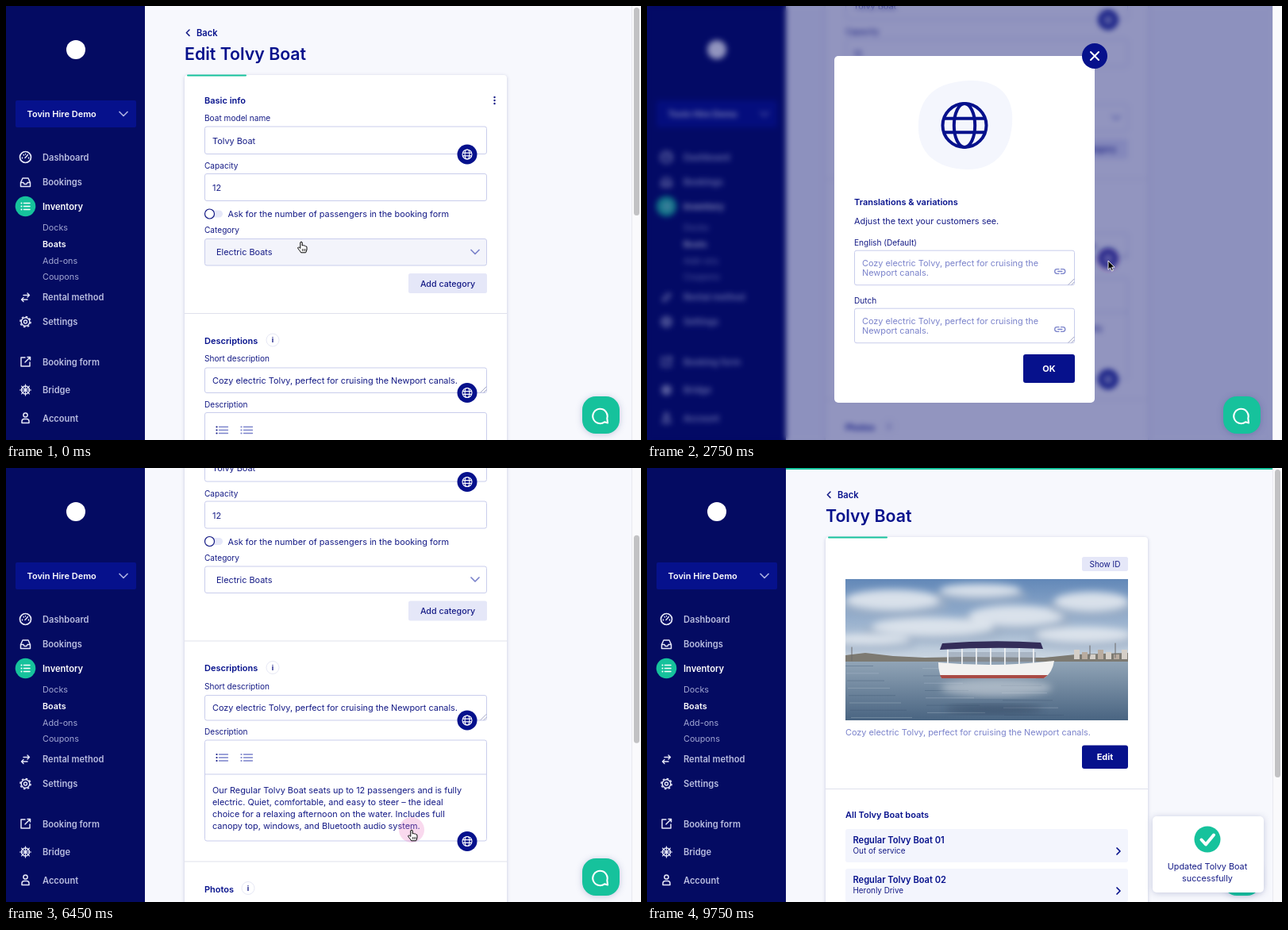
Recreate the animation shown at these times as an HTML page. Size 800 px wide and 547 px high, loop 9.8 s.

```html
<!DOCTYPE html>
<html lang="en">
<head>
<meta charset="utf-8">
<title>Edit boat</title>
<style>
  html, body { margin: 0; width: 100%; height: 100%; overflow: hidden; background: #f7f8fd; }
  #stage { position: relative; width: 800px; height: 547px; overflow: hidden; }
  svg, #veil { position: absolute; left: 0; top: 0; }
  svg { display: block; font-family: Inter, "Noto Sans", sans-serif; }
  #veil { width: 788px; height: 547px; background: rgba(4, 10, 108, .43); backdrop-filter: blur(3.5px); }
  .card { filter: drop-shadow(0 1px 2px rgba(20, 30, 110, .22)); }
  .float { filter: drop-shadow(0 1px 4px rgba(20, 30, 110, .22)); }
</style>
</head>
<body>
<div id="stage">
  <svg id="base" width="800" height="547"></svg>
  <div id="veil"></div>
  <svg id="top" width="800" height="547"></svg>
</div>
<script>
const NAVY = '#06118c', INK = '#151b86', SOFT = '#7b83cb', LINE = '#c9cdec', TEAL = '#16c29c',
      PALE = '#e5e7f8', MIST = '#f3f5fd', DIM = '#b9bde0', RULE = '#dfe1ec';
const BOAT = 'Tolvy Boat', BLURB = 'Cozy electric Tolvy, perfect for cruising the Newport canals.';

// Drawing helpers, each returns markup
const rect = (x, y, w, h, fill, r = 0, more = '') =>
  `<rect x="${x}" y="${y}" width="${w}" height="${h}" rx="${r}" fill="${fill}" ${more}/>`;
const disc = (x, y, r, fill, more = '') => `<circle cx="${x}" cy="${y}" r="${r}" fill="${fill}" ${more}/>`;
const oval = (x, y, rx, ry, fill, more = '') =>
  `<ellipse cx="${x}" cy="${y}" rx="${rx}" ry="${ry}" fill="${fill}" ${more}/>`;
const line = (d, color, w = 1.5, more = '') =>
  `<path d="${d}" fill="none" stroke="${color}" stroke-width="${w}" stroke-linecap="round" stroke-linejoin="round" ${more}/>`;
const text = (x, y, s, size = 10.9, fill = INK, weight = 400, anchor = 'start') =>
  `<text x="${x}" y="${y}" font-size="${size}" fill="${fill}" font-weight="${weight}" text-anchor="${anchor}">${s}</text>`;
const bold = (x, y, s, fill = NAVY) => text(x, y, s, 11, fill, 600);
const label = (x, y, s) => text(x, y, s, 10.1);
const group = (id, body, more = '') => `<g id="${id}" ${more}>${body}</g>`;
const rule = y => rect(225, y, 406, 1, RULE);
const box = (x, y, w, h, more = '') => rect(x, y, w, h, '#fff', 2.5, `stroke="${LINE}" ${more}`);
const button = (x, y, w, h, s) =>
  rect(x, y, w, h, NAVY, 3) + text(x + w / 2, y + h / 2 + 4, s, 11, '#fff', 700, 'middle');

function globe(x, y, r, w, color) {
  const a = r * .92, b = r * .32;
  return disc(x, y, r, 'none', `stroke="${color}" stroke-width="${w}"`) +
    oval(x, y, r * .48, r, 'none', `stroke="${color}" stroke-width="${w}"`) +
    line(`M${x - a} ${y - b}H${x + a}M${x - a} ${y + b}H${x + a}`, color, w);
}
const globeButton = y => disc(581, y, 12.5, NAVY) + globe(581, y, 6, 1.1, '#fff');
const info = (x, y) => disc(x, y, 8, '#fff', `stroke="#e6e8f5"`) + text(x, y + 3.2, 'i', 9, INK, 700, 'middle');
const toggle = y => rect(252, y - 4.5, 21, 9, PALE, 4.5) + disc(256.5, y, 6, '#fff', `stroke="${INK}" stroke-width="1.2"`);
const chevron = (x, y, color) => line(`M${x - 5} ${y - 2.5}l5 5 5-5`, color, 1.7);
const grip = (x, y, color = '#8a8fb5') => line(`M${x - 7} ${y}l7-7M${x - 3} ${y}l3-3`, color, .8);
const bullets = (x, y, color) => [-4, 0, 4].map(d =>
  line(`M${x - 3.5} ${y + d}h11`, SOFT, 1.3) + disc(x - 6.5, y + d, 1.1, color)).join('');

function header(title) {
  return line('M231 30l-3.7 3.7 3.7 3.7', INK, 1.5) + text(240, 37.6, 'Back', 11.1, NAVY, 600) +
    text(225, 68, title, 21.3, NAVY, 600);
}
const card = h => rect(225, 87, 406, h, '#fff', 4, 'class="card"') + rect(228, 86.5, 75, 2, TEAL, 1);

// Soft picture of a boat on a bay, 356 by 178
function photo() {
  const clouds = [[60, 28, 70, 16], [170, 16, 60, 10], [215, 48, 70, 16], [310, 30, 55, 15],
    [110, 62, 90, 14], [300, 72, 70, 12], [30, 78, 60, 8]];
  let s = rect(0, 0, 356, 178, 'url(#sky)');
  s += '<g filter="url(#soft)">' + clouds.map(([x, y, a, b]) =>
    oval(x, y + 5, a, b, '#9fb0c6', 'opacity=".7"') + oval(x, y - 2, a * .85, b * .8, '#e6ebf1', 'opacity=".85"')).join('') + '</g>';
  s += rect(0, 102, 356, 76, 'url(#sea)');
  s += `<path d="M0 104V96L25 93 60 97 100 99 150 98 250 99 290 95 356 93V104Z" fill="#7d7a72"/>`;
  for (let i = 0; i < 7; i++) s += rect(288 + i * 10, 89 + i % 3 * 3, 7, 12 - i % 3 * 3, i % 2 ? '#b9aca0' : '#d5cfc8');
  s += line('M8 103V86M340 99V81M308 97V84', '#6d6a6a', 1);
  for (let i = 0; i < 22; i++) {
    const y = 109 + i * 3.1, x = (i * 97) % 290;
    s += rect(x, y, 35 + i * 2, 1, i % 2 ? '#b5c4d2' : '#39546f', 0, 'opacity=".35"');
  }
  s += oval(190, 137, 70, 11, '#d6dce2', 'opacity=".55" filter="url(#soft)"');
  s += oval(187, 164, 62, 6, '#2c3c58', 'opacity=".45" filter="url(#soft)"');
  s += rect(128, 92, 112, 13, '#8e9aa9', 0, 'opacity=".5"');
  for (let i = 0; i < 7; i++) s += rect(128 + i * 18, 87, 1.8, 21, '#eef0f2');
  s += `<path d="M119 89L122 81Q184 76 246 80L249 88Q184 85 119 89Z" fill="#332d59"/>`;
  s += `<path d="M117 105Q190 112 263 103Q261 118 250 125H121Q117 116 117 105Z" fill="#f2f2f1"/>`;
  return s + `<path d="M119 121H255L250 125H121Z" fill="#a94b45"/>`;
}

function editPage() {
  let s = rect(175, 0, 614, 1125, '#f7f8fd') + header('Edit ' + BOAT) + card(985.5);
  s += bold(250, 123, 'Basic info') + [-4, 0, 4].map(d => disc(615.5, 119 + d, 1.2, INK)).join('');
  s += label(250, 144.5, 'Boat model name') + box(250.5, 152, 355, 34.5) + text(260, 173.5, BOAT) + globeButton(187);
  s += label(250, 205, 'Capacity') + box(250.5, 211.5, 355, 34) + text(260, 233, '12');
  s += toggle(262) + text(279.5, 266.2, 'Ask for the number of passengers in the booking form');
  s += label(250, 286, 'Category') + box(250.5, 293.5, 355, 33.5, 'id="pick"') + text(265, 314, 'Electric Boats') + chevron(591, 310, SOFT);
  s += rect(507, 337, 99, 25, PALE, 2.5) + text(556.5, 353.5, 'Add category', 10.7, INK, 500, 'middle') + rule(387);
  s += bold(250, 425.7, 'Descriptions') + info(336, 421);
  s += label(250, 448, 'Short description') + box(250.5, 456, 355, 31.5) + grip(605, 487) + text(260, 475.7, BLURB) + globeButton(487.5);
  s += label(250, 505.5, 'Description') + box(250.5, 512.5, 355, 127) + rect(250.5, 555, 355, 1, LINE);
  s += bullets(272, 534.5, INK) + bullets(303, 534.5, SOFT);
  ['Our Regular ' + BOAT + ' seats up to 12 passengers and is fully', 'electric. Quiet, comfortable, and easy to steer – the ideal',
    'choice for a relaxing afternoon on the water. Includes full', 'canopy top, windows, and Bluetooth audio system.'
  ].forEach((row, i) => s += text(260, 579 + i * 15.1, row));
  s += globeButton(640) + rule(665);
  s += bold(250, 704, 'Photos') + info(305, 699);
  s += rect(250.5, 718, 355, 102.5, MIST, 3, `stroke="${LINE}" stroke-dasharray="3 2"`);
  s += line('M418 751h-3v19h19v-3', NAVY, 2, 'stroke-dasharray="2.5 3.2" stroke-linecap="butt"') +
    rect(421.5, 744, 20, 20, MIST, 1, `stroke="${NAVY}" stroke-width="2"`) +
    line('M422 760l6-6 4 4 4-4 5 5', NAVY, 1.8) + disc(435.5, 749.5, 1.9, 'none', `stroke="${NAVY}" stroke-width="1.3"`);
  s += text(428, 792, 'Drop images here', 10.9, SOFT, 400, 'middle');
  s += rect(535.5, 830.5, 70, 24.5, '#fff', 2.5, `stroke="${NAVY}"`) + text(570.5, 847.2, 'Pick file', 10.9, INK, 400, 'middle');
  s += rect(250.5, 865, 355, 32, '#fff', 2, 'stroke="#eceef7"');
  s += [-3.8, -1.3, 1.3, 3.8].map(d => rect(258.5, 880.5 + d, 6.5, 1, INK)).join('');
  s += '<g transform="translate(273 865.4) scale(.177)"><use href="#photo"/></g>' + text(345, 885.5, 'Bay-Island-Specs-v1-768x536.jpg', 11, SOFT);
  s += disc(589, 881, 7, NAVY) + line('M586.5 878.5l5 5m0-5l-5 5', '#fff', 1.4);
  s += rule(923) + toggle(954.5) + text(279.5, 959, 'Limit the number of boats per booking') + rule(986);
  return s + button(531, 1011.5, 75, 36, 'Save');
}

function viewPage() {
  let s = rect(175, 0, 614, 547, '#f7f8fd') + header(BOAT) + card(560);
  s += rect(548, 112, 58, 18, PALE, 2.5) + text(577, 124.6, 'Show ID', 10, INK, 400, 'middle');
  s += '<g transform="translate(250 140)"><use href="#photo"/></g>' + text(250, 337, BLURB, 10.9, SOFT);
  s += button(548, 349.5, 58, 29.5, 'Edit') + rule(404) + bold(250, 441.3, `All ${BOAT} boats`);
  [['01', 'Out of service'], ['02', 'Heronly Drive']].forEach(([n, note], i) => {
    const y = 455 + i * 50;
    s += rect(250, y, 356, 42, MIST, 3) + text(259.5, y + 17.7, `Regular ${BOAT} ${n}`, 11.1, NAVY, 600) +
      text(259.5, y + 31, note, 9.9) + line(`M592 ${y + 24}l4 4-4 4`, NAVY, 1.7);
  });
  return s;
}

function sidebar() {
  const W = '#e6e8f8', w = 1.5;
  let s = rect(0, 0, 175, 547, '#040b62') + disc(88, 55, 12, '#fff');
  s += rect(12, 119, 152, 34, NAVY, 2) + text(26.5, 140, 'Tovin Hire Demo', 11, '#fff', 600) + chevron(148, 136, '#a9aee0');
  s += disc(24.5, 252.5, 12.8, TEAL);
  [['Dashboard', 194.5], ['Bookings', 226], ['Inventory', 256.5, 1], ['Rental method', 371], ['Settings', 402],
    ['Booking form', 452.5], ['Bridge', 487.7], ['Account', 523.5]
  ].forEach(([name, y, on]) => s += text(46, y, name, 11.1, on ? '#fff' : DIM, 600));
  ['Docks', 'Boats', 'Add-ons', 'Coupons'].forEach((name, i) =>
    s += text(46, 283 + i * 20.8, name, 10.8, i === 1 ? '#fff' : '#a2a7d3', i === 1 ? 600 : 400));
  s += disc(24.5, 190.5, 7, 'none', `stroke="${W}" stroke-width="1.7"`) + line('M24 191.5l3.5-4M20.5 192v-1M22 187.5l.5.5M24.5 186.5v.5M28.5 192v-1', W, 1.4);
  s += line('M18.5 222.5l2.5-5.5h7l2.5 5.5v5h-12zM18.5 222.5h3.5l1 2h3l1-2h3.5', W, w);
  s += [-4, 0, 4].map(d => line(`M22.5 ${252.5 + d}h7.5`, '#fff', 1.5) + disc(19.5, 252.5 + d, 1, '#fff')).join('');
  s += line('M22 364.5h7.5m-2.5-2.5l2.5 2.5-2.5 2.5M27 370h-7.5m2.5-2.5l-2.5 2.5 2.5 2.5', W, 1.4);
  s += disc(24.5, 398, 5.3, 'none', `stroke="${W}" stroke-width="1.5"`) + disc(24.5, 398, 2, 'none', `stroke="${W}" stroke-width="1.4"`) +
    disc(24.5, 398, 6.6, 'none', `stroke="${W}" stroke-width="1.5" stroke-dasharray="2.6 2.58"`);
  s += line('M24 443h-5v11h11v-5M27 442.5h3.5v3.5M30 443l-6 6', W, w);
  s += disc(24.5, 484, 5, 'none', `stroke="${W}" stroke-width="1.5"`) + disc(24.5, 484, 1.5, W) +
    [0, 45, 90, 135].map(a => line('M17.5 484h14', W, 1.2, `transform="rotate(${a} 24.5 484)"`)).join('');
  return s + disc(24.5, 515.5, 2.6, 'none', `stroke="${W}" stroke-width="1.5"`) + line('M20 525.5v-2q0-3 3-3h3q3 0 3 3v2z', W, w);
}

function field(name, y, id) {
  const link = line('M519 0h-2.5a2.8 2.8 0 0 0 0 5.6h2.5m2.5-5.6h2.5a2.8 2.8 0 0 1 0 5.6h-2.5m-3.8-2.8h5.2', SOFT, 1.3, `transform="translate(0 ${y + 30})"`);
  return label(261, y, name) + box(261.5, y + 6.5, 277, 43.5, `id="${id}"`) + grip(538, y + 49.5) +
    text(271, y + 26.3, 'Cozy electric Tolvy, perfect for cruising the', 10.9, SOFT) + text(271, y + 38.3, 'Newport canals.', 10.9, SOFT) + link;
}

function dialog() {
  return rect(236, 63, 328, 437, '#fff', 5, 'id="sheet"') +
    `<path d="M342 146C345 112 366 96 405 94C447 92 463 118 460 148C458 184 437 207 402 206C366 205 339 186 342 146Z" fill="#f4f6fd"/>` +
    globe(400, 150.5, 27.5, 4, NAVY) + disc(564, 63, 16, NAVY) + line('M559 58l10 10m0-10l-10 10', '#fff', 2) +
    bold(261, 251, 'Translations &amp; variations') + text(261, 275, 'Adjust the text your customers see.') +
    group('fields', field('English (Default)', 301.7, 'first') + field('Dutch', 374.7, 'second')) +
    group('confirm', button(474, 439, 65, 36, 'OK'));
}

const chat = rect(726, 492, 47, 47, TEAL, 17, 'class="float"') +
  line('M754 524.3A9.2 9.2 0 1 1 757.3 519.5L758 525.5Z', '#fff', 2.1);
const toast = rect(637, 439, 140, 96, '#fff', 5, 'class="float"') + disc(706, 468, 16.5, TEAL) +
  line('M698.5 468.5l5.5 6 10-12', '#fff', 4, 'stroke-linecap="butt"') +
  text(706, 505.5, 'Updated ' + BOAT, 10.8, INK, 400, 'middle') + text(706, 521, 'successfully', 10.8, INK, 400, 'middle');
const pointers = {
  arrow: '<path d="M0 0V11.3L2.6 8.9 4.5 13 6.4 12.2 4.6 8.2H8Z" fill="#000" stroke="#fff" stroke-width=".9"/>',
  hand: '<path d="M-1.2 .9Q0-.6 1.2 .9V5Q2.4 4 3.4 5.1 4.6 4.5 5.4 5.8 7 5.5 7 7.2V10Q6.6 12 5.6 13.8H-.4Q-1.6 11.5-3.8 9.2-5 7.4-3.6 7-2.6 6.8-1.2 8.4Z" fill="#fff" stroke="#000" stroke-width="1"/><path d="M1.4 9v3M3.2 9v3M5 9v3" stroke="#000" stroke-width=".7"/>',
  beam: '<path d="M-2-5.5Q0-5.5 0-4V4Q0 5.5-2 5.5M2-5.5Q0-5.5 0-4M2 5.5Q0 5.5 0 4M-1.2 1H1.2" fill="none" stroke="#000" stroke-width="1"/>'
};

const $ = id => document.getElementById(id);
$('base').innerHTML = `<defs>
  <linearGradient id="sky" x1="0" y1="0" x2="0" y2="1"><stop offset="0" stop-color="#6288b8"/><stop offset=".55" stop-color="#c8d4e0"/></linearGradient>
  <linearGradient id="sea" x1="0" y1="0" x2="0" y2="1"><stop offset="0" stop-color="#93a6b8"/><stop offset="1" stop-color="#496481"/></linearGradient>
  <filter id="soft"><feGaussianBlur stdDeviation="5"/></filter>
  <clipPath id="frame"><rect width="356" height="178"/></clipPath>
  ${group('photo', photo(), 'clip-path="url(#frame)"')}</defs>` +
  group('edit', editPage()) + group('view', viewPage()) + rect(175, 0, 0, 2, TEAL, 0, 'id="bar"') + sidebar();
$('top').innerHTML = rect(788, 0, 12, 547, '#fafafc') + rect(788, 0, 1, 547, '#e9e9ef') + rect(791, 2, 7, 262, '#c2c2c4', 3.5, 'id="thumb"') +
  group('dialog', dialog()) + chat + group('toast', toast) + disc(0, 0, 16, '#e86cbc', 'id="ring"') +
  group('cursor', Object.keys(pointers).map(k => group(k, pointers[k])).join(''));

const LOOP = 9800, BOTTOM = 575.5, MIDDLE = 169.5;
const part = (t, a, b) => Math.min(1, Math.max(0, (t - a) / (b - a)));
const smooth = u => (1 - Math.cos(Math.PI * u)) / 2;
const out = u => Math.sin(u * Math.PI / 2);
const moves = [[50, 372, 297], [1000, 637, 374], [1750, 637, 374], [2200, 581, 321], [3050, 581, 321], [3800, 385, 398],
  [4650, 385, 398], [5350, 490, 440], [5650, 490, 440], [6000, 511, 456], [6450, 511, 456], [6950, 707, 334],
  [8300, 707, 334], [8850, 567, 453]];
const clicks = [2250, 3870, 6100, 8950];

function place(t) {
  let [, x, y] = moves[0];
  for (let i = 1; i < moves.length; i++) {
    const u = smooth(part(t, moves[i - 1][0], moves[i][0]));
    x += (moves[i][1] - moves[i - 1][1]) * u;
    y += (moves[i][2] - moves[i - 1][2]) * u;
  }
  return [x, y];
}
function pointer(t) {
  if (t < 350 || t >= 5800 && t < 6560 || t >= 8700) return 'hand';
  return t >= 3560 && t < 5150 ? 'beam' : 'arrow';
}
const set = (id, values) => { for (const k in values) $(id).setAttribute(k, values[k]); };
const show = (id, on) => { $(id).style.display = on ? '' : 'none'; };

function draw(t) {
  const done = t >= 9300;
  const scroll = MIDDLE * out(part(t, 1030, 1750)) + (BOTTOM - MIDDLE) * smooth(part(t, 7280, 8180));
  set('edit', { transform: `translate(0 ${-Math.round(scroll * 2) / 2})` });
  show('edit', !done);
  show('view', done);
  set('pick', { fill: t < 350 ? '#f3f4fb' : '#fff' });
  set('bar', { width: 625 * out(part(t, 9000, 9600)) });

  const open = part(t, 2250, 2550) * (1 - part(t, 6130, 6430)), full = t >= 2600;
  $('veil').style.opacity = open;
  show('veil', open > 0);
  show('dialog', open > 0);
  set('dialog', { opacity: open, transform: `translate(0 ${full ? 0 : 70})` });
  set('sheet', { height: full ? 437 : 290 });
  set('confirm', { transform: `translate(0 ${full ? 0 : -146.5})` });
  show('fields', full);
  const focus = t >= clicks[1];
  set('second', { fill: focus ? MIST : '#fff', stroke: focus ? '#20253f' : LINE });

  show('thumb', open === 0);
  set('thumb', { y: done ? 2 : 2 + scroll * .488, height: done ? 388 : 262 });
  const rise = out(part(t, 9420, 9650));
  set('toast', { opacity: rise, transform: `translate(0 ${12 * (1 - rise)})` });

  const [x, y] = place(t), kind = pointer(t);
  const hit = clicks.filter(c => c <= t).pop();
  const glow = hit === undefined ? 0 : .7 * (1 - part(t, hit, hit + 550));
  set('ring', { cx: x, cy: y, opacity: done ? 0 : glow });
  set('cursor', { transform: `translate(${x} ${y})` });
  show('cursor', !done);
  for (const k in pointers) show(k, k === kind);
}

const start = performance.now();
function tick() {
  draw((performance.now() - start) % LOOP);
  requestAnimationFrame(tick);
}
tick();
</script>
</body>
</html>
```
